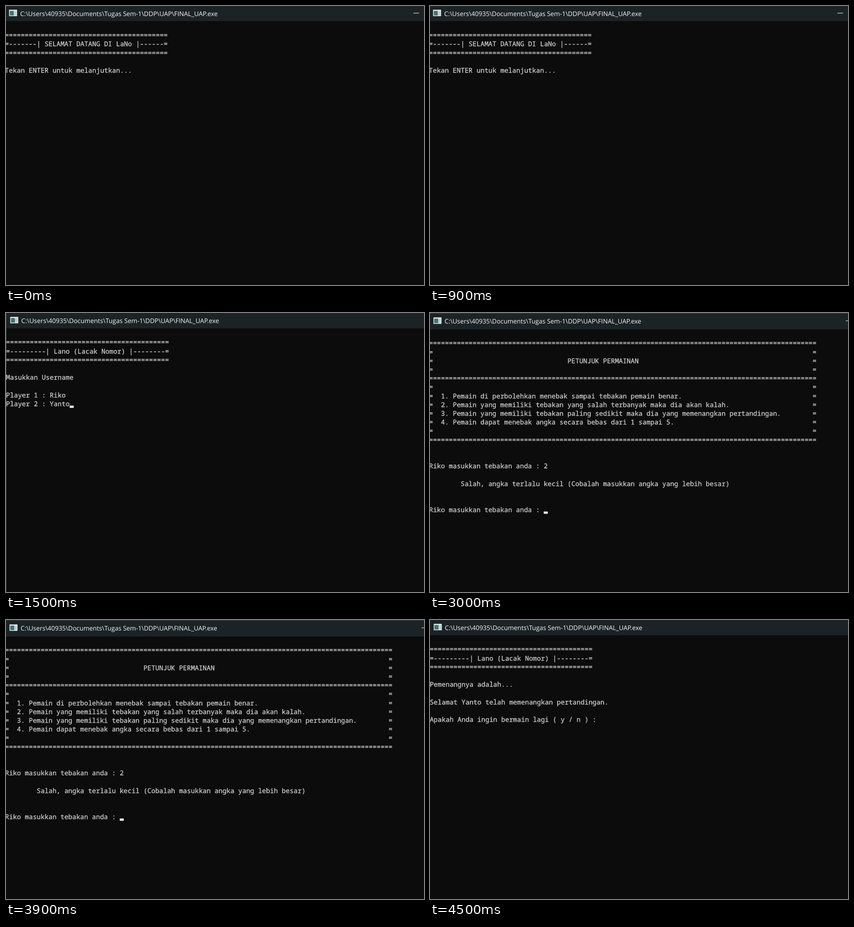
An HTML page that plays this animation: 916x611 px, repeating every 6000 ms.

```html
<!DOCTYPE html>
<html lang="id">
<head>
<meta charset="utf-8">
<title>Console game</title>
<style>
  html, body { margin: 0; width: 100%; height: 100%; overflow: hidden; background: #0c0c0c; }
  svg { display: block; width: 916px; height: 611px; }
  text { white-space: pre; text-rendering: geometricPrecision; }
  .line {
    font-family: "Noto Sans Mono", monospace; font-variant-ligatures: none;
    fill: #cfcfcf; stroke: #cfcfcf; stroke-width: .3px;
  }
  .title { font-family: "Open Sans", sans-serif; fill: #f6f7f7; }
</style>
</head>
<body>
<svg id="stage" viewBox="0 0 916 611"></svg>
<script>
const HOLD = 1500;
const PATH = String.raw`C:\Users\40935\Documents\Tugas Sem-1\DDP\UAP\FINAL_UAP.exe`;
const stage = document.getElementById("stage");

const rule = n => "=".repeat(n);
const side = (s = "") => "=" + s.padEnd(96) + "=";
const banner = s => ["", rule(41), s, rule(41), ""];
const gameBanner = banner("=---------| Lano (Lacak Nomor) |--------=");
const ask = "Riko masukkan tebakan anda : ";

// x, y: first cell and baseline; pitch, leading: cell size; bar: title bar height
const screens = [
  {
    x: -2.4, y: 49.8, pitch: 8.71, leading: 19.25, bar: 33, titleX: 31, minimize: 893,
    lines: [
      ...banner("=-------| SELAMAT DATANG DI LaNo |------="),
      "Tekan ENTER untuk melanjutkan..."
    ]
  },
  {
    x: 0, y: 50.2, pitch: 8.72, leading: 19.25, bar: 33.7, titleX: 33.6, cursor: [16, 8],
    edge: [0, 0, 1, 611],
    lines: [
      ...gameBanner,
      "Masukkan Username",
      "",
      "Player 1 : Riko",
      "Player 2 : Yanto"
    ]
  },
  {
    x: -2, y: 52.1, pitch: 8.664, leading: 19.2, bar: 36, titleX: 32, minimize: 911, cursor: [29, 20],
    edge: [0, 0, 916, 1],
    lines: [
      "",
      rule(98),
      side(),
      side(" ".repeat(34) + "PETUNJUK PERMAINAN"),
      side(),
      rule(98),
      side(),
      side("  1. Pemain di perbolehkan menebak sampai tebakan pemain benar."),
      side("  2. Pemain yang memiliki tebakan yang salah terbanyak maka dia akan kalah."),
      side("  3. Pemain yang memiliki tebakan paling sedikit maka dia yang memenangkan pertandingan."),
      side("  4. Pemain dapat menebak angka secara bebas dari 1 sampai 5."),
      side(),
      rule(98),
      "",
      "",
      ask + "2",
      "",
      "        Salah, angka terlalu kecil (Cobalah masukkan angka yang lebih besar)",
      "",
      "",
      ask
    ]
  },
  {
    x: -0.6, y: 50, pitch: 8.71, leading: 19.25, bar: 33.4, titleX: 32.6,
    lines: [
      ...gameBanner,
      "Pemenangnya adalah...",
      "",
      "Selamat Yanto telah memenangkan pertandingan.",
      "",
      "Apakah Anda ingin bermain lagi ( y / n ) :"
    ]
  }
];

function add(parent, tag, attrs = {}, text = "") {
  const el = document.createElementNS("http://www.w3.org/2000/svg", tag);
  for (const key in attrs) el.setAttribute(key, attrs[key]);
  el.textContent = text;
  parent.append(el);
  return el;
}

const box = (g, x, y, width, height, fill) => add(g, "rect", { x, y, width, height, fill });

function build(s) {
  const g = add(stage, "g");
  const mid = s.bar / 2 - 1;

  box(g, 0, 0, 916, 611, "#0c0c0c");
  box(g, 0, 0, 916, s.bar, "#1c2326");
  if (s.edge) box(g, ...s.edge, "#44494a");

  const iconX = s.titleX - 24.3;
  box(g, iconX, mid - 7.3, 17.5, 14, "#e9eded");
  box(g, iconX + 1.5, mid - 4.8, 9, 10, "#3f7477");
  box(g, iconX + 11.5, mid - 4.8, 4.5, 10, "#c3cccd");
  add(g, "text", {
    class: "title", x: s.titleX, y: mid + 6.2, "font-size": s.pitch * 1.6
  }, PATH);
  if (s.minimize) box(g, s.minimize, mid - 0.5, 12, 1.2, "#e0e2e2");

  s.lines.forEach((line, row) => {
    if (!line) return;
    add(g, "text", {
      class: "line", x: s.x, y: s.y + row * s.leading, "font-size": s.pitch / 0.6
    }, line);
  });

  if (s.cursor) {
    const [col, row] = s.cursor;
    box(g, s.x + col * s.pitch, s.y + row * s.leading - 1.4, 8.8, 5, "#f2f2f2");
  }
  return g;
}

const groups = screens.map(build);

function draw() {
  const current = Math.floor(performance.now() / HOLD) % groups.length;
  groups.forEach((g, i) => g.setAttribute("visibility", i === current ? "visible" : "hidden"));
  requestAnimationFrame(draw);
}
draw();
</script>
</body>
</html>
```
